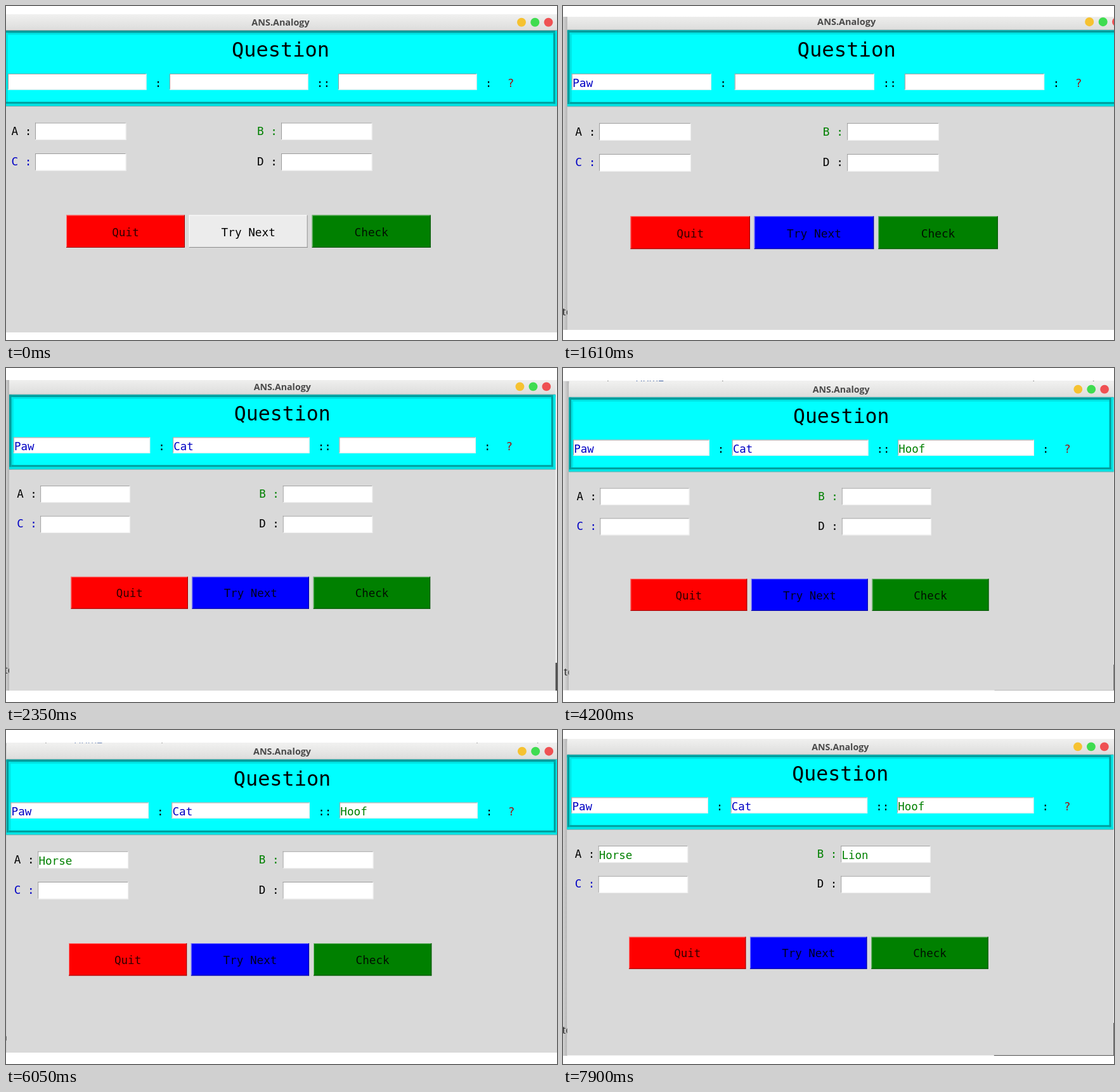
An HTML page with a canvas for the animation above (8 s loop, 869 by 528 pixels).

```html
<!DOCTYPE html>
<html>
<head>
<meta charset="utf-8">
<style>
html, body { margin: 0; width: 100%; height: 100%; overflow: hidden; background: #fff; }
canvas { display: block; }
</style>
</head>
<body>
<canvas id="stage" width="869" height="528"></canvas>
<script>
const ctx = document.getElementById('stage').getContext('2d');
const MONO = '"DejaVu Sans Mono", monospace';
const LEFT = -3.8, RIGHT = 870, TOP = 12.9, BOTTOM = 520.3;

// Start time, camera offset and zoom, visible band, number of filled fields
const scenes = [
  { at: 0,    x: 0,    y: 0,    zoom: 1,     top: 13, bottom: 516, filled: 0 },
  { at: 500,  x: 10.7, y: -0.9, zoom: 1.008, top: 17, bottom: 512, filled: 1 },
  { at: 2350, x: 8.8,  y: 4,    zoom: 0.986, top: 19, bottom: 510, filled: 2 },
  { at: 4200, x: 13.1, y: 8.3,  zoom: 0.983, top: 20, bottom: 509.5, filled: 3 },
  { at: 6050, x: 4.4,  y: 8,    zoom: 0.9957, top: 20, bottom: 510, filled: 4 },
  { at: 7900, x: 10.3, y: 1,    zoom: 0.986, top: 14, bottom: 515, filled: 5 }
];
const BLUE = '#0000c4', GREEN = '#008000';
const fields = [
  [3, 107, 218.5, 25.5, 'Paw', BLUE],
  [258, 107, 218.5, 25.5, 'Cat', BLUE],
  [524, 107, 218.5, 25.5, 'Hoof', GREEN],
  [46, 184.5, 143.5, 27.5, 'Horse', GREEN],
  [434, 184.5, 143.5, 27.5, 'Lion', GREEN],
  [46, 233, 143.5, 27.5],
  [434, 233, 143.5, 27.5]
];

function rect(x, y, w, h, color) {
  ctx.fillStyle = color;
  ctx.fillRect(x, y, w, h);
}

function text(str, x, y, color = '#000', font = '17.7px ' + MONO, align = 'left') {
  ctx.fillStyle = color;
  ctx.font = font;
  ctx.textAlign = align;
  ctx.fillText(str, x, y);
}

// Top and left edges in one colour, bottom and right in another
function bevel(x, y, w, h, size, upper, lower) {
  rect(x, y, w, size, upper);
  rect(x, y, size, h, upper);
  rect(x, y + h - size, w, size, lower);
  rect(x + w - size, y, size, h, lower);
}

function button(x, label, face, light, dark, ink) {
  rect(x, 330.5, 187, 51.5, face);
  bevel(x, 330.5, 187, 51.5, 1, light, dark);
  text(label, x + 93.5, 363.5, ink, undefined, 'center');
}

function desktop() {
  rect(-30, 0, 930, 540, '#efefef');
  rect(679, 468.6, 220, 80, '#505050');
  text('to', -12, 486, '#333', '17px "Noto Serif", serif');
  text('Home', 103, 17, '#34579c', '16px "Noto Sans", sans-serif');
  for (const x of [58, 242, 741, 837]) rect(x, 8, 1.5, 8, '#777');
  const shade = ctx.createLinearGradient(-16, 0, LEFT, 0);
  shade.addColorStop(0, 'rgba(0,0,0,0)');
  shade.addColorStop(1, 'rgba(0,0,0,.25)');
  rect(-16, TOP, 16 + LEFT, 540, shade);
}

function titleBar() {
  const fade = ctx.createLinearGradient(0, TOP, 0, 39);
  fade.addColorStop(0, '#f1f1f0');
  fade.addColorStop(1, '#dcdcdb');
  ctx.fillStyle = fade;
  ctx.beginPath();
  ctx.roundRect(LEFT, TOP, RIGHT - LEFT, 26.5, [5, 5, 0, 0]);
  ctx.fill();
  rect(LEFT, 38, RIGHT - LEFT, 1.2, '#8fa5a5');
  text('ANS.Analogy', 433, 31, '#4a4a4a', 'bold 14.4px "Open Sans", sans-serif', 'center');
  [['#f6c231', 813], ['#3fdc50', 834.3], ['#ef5153', 855.5]].forEach(([color, x]) => {
    ctx.fillStyle = color;
    ctx.beginPath();
    ctx.arc(x, 25.8, 7, 0, 7);
    ctx.fill();
  });
}

function questionPanel() {
  const w = RIGHT - LEFT, dark = '#009c9c', light = '#00e4e4';
  rect(LEFT, 39, w, 119.5, '#0ff');
  bevel(LEFT, 39, w, 119.5, 3.8, dark, light);
  bevel(LEFT + 3.8, 42.5, w - 7.6, 112, 3, light, dark);
  rect(LEFT, 158, w, 1, '#7fb0b0');
  text('Question', 433, 80, '#000', '32px ' + MONO, 'center');
  [[':', 240], ['::', 500.5], [':', 761], ['?', 796]].forEach(([str, x]) =>
    text(str, x, 128, str === '?' ? '#a01414' : '#000', undefined, 'center'));
}

function draw(s) {
  ctx.setTransform(1, 0, 0, 1, 0, 0);
  rect(0, 0, 869, 528, '#fff');
  ctx.save();
  ctx.beginPath();
  ctx.rect(0, s.top, 869, s.bottom - s.top);
  ctx.clip();
  ctx.transform(s.zoom, 0, 0, s.zoom, s.x, s.y);

  desktop();
  rect(LEFT, 39, RIGHT - LEFT, BOTTOM - 39, '#d9d9d9');
  titleBar();
  questionPanel();

  text('A :', 8.5, 204);
  text('B :', 396, 204, GREEN);
  text('C :', 8.5, 252, BLUE);
  text('D :', 396, 252);
  fields.forEach(([x, y, w, h, word, color], i) => {
    rect(x, y, w, h, '#fff');
    bevel(x, y, w, h, 1, '#9c9c9c', '#ececec');
    if (i < s.filled) text(word, x + 1.2, y + 21, color);
  });

  button(95, 'Quit', '#f00', '#ff7f7f', '#990000', '#300000');
  if (s.filled) button(288.7, 'Try Next', '#00f', '#7f7fff', '#000099', '#000020');
  else button(288.7, 'Try Next', '#ececec', '#fff', '#8d8d8d', '#000');
  button(482.7, 'Check', '#008000', '#7fbf7f', '#004d00', '#001000');
  ctx.restore();
}

const start = performance.now();
function tick() {
  const t = (performance.now() - start) % 8000;
  draw(scenes.findLast(s => t >= s.at));
  requestAnimationFrame(tick);
}
tick();
</script>
</body>
</html>
```
